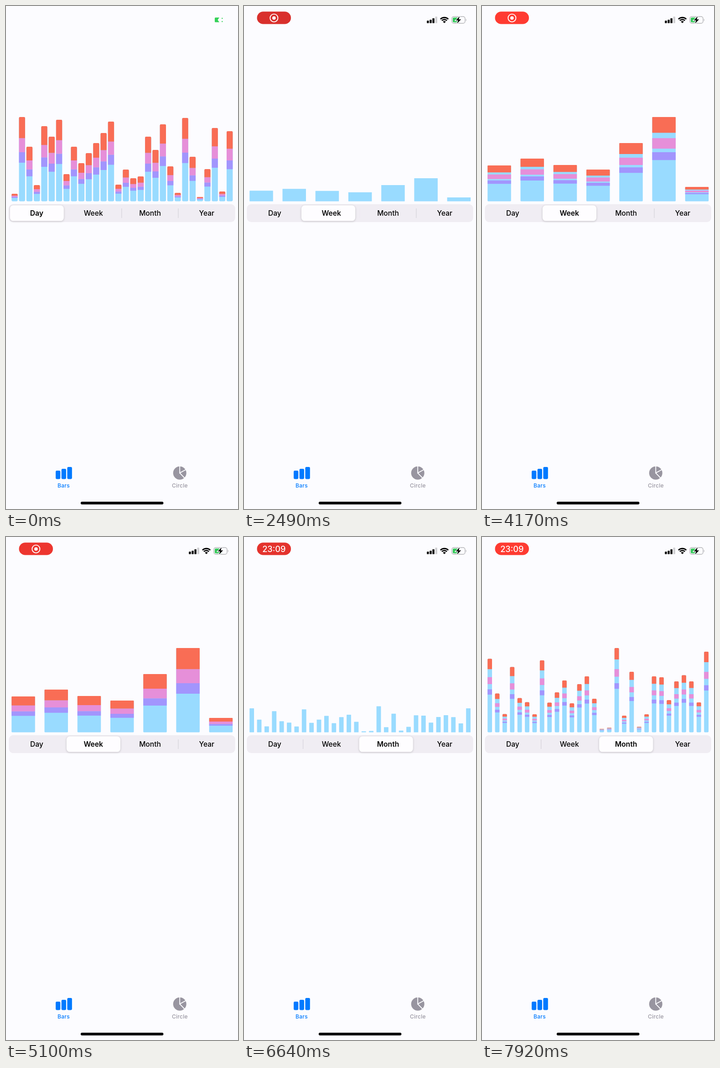
An HTML page that plays this animation: 509 by 1101 pixels, repeating every 8000 ms.

```html
<!DOCTYPE html>
<html lang="en">
<head>
<meta charset="utf-8">
<title>Stacked bars</title>
<style>
  html, body { margin: 0; width: 100%; height: 100%; overflow: hidden; background: #fcfcff; }
  svg { display: block; width: 100%; height: 100%; font-family: Inter, "Liberation Sans", sans-serif; }
  .thumb { filter: drop-shadow(0 1.5px 2px rgba(0, 0, 0, .2)); }
</style>
</head>
<body>
<svg viewBox="0 0 509 1101">
  <rect width="509" height="1101" fill="#fcfcff"/>

  <g id="status">
    <rect id="pill" x="28.5" y="12.2" width="74.5" height="27.4" rx="13.7"/>
    <g id="record">
      <circle cx="65.8" cy="26.2" r="8.6" fill="none" stroke="#fff" stroke-width="1.9"/>
      <circle cx="65.8" cy="26.2" r="3.8" fill="#fff"/>
    </g>
    <text id="clock" x="65.8" y="32.6" font-size="18.2" font-weight="500" fill="#fff" text-anchor="middle">23:09</text>

    <rect x="401.2" y="32" width="4.4" height="5.6" rx="1.2"/>
    <rect x="407.3" y="30" width="4.4" height="7.6" rx="1.2"/>
    <rect x="413.4" y="26.8" width="4.4" height="10.8" rx="1.2"/>
    <rect x="419.5" y="23.3" width="4.4" height="14.3" rx="1.2" fill="#cfcfd2"/>

    <path d="M439.6 37.6 l-3.3 -3.3 a4.7 4.7 0 0 1 6.6 0z"/>
    <path d="M434 31.9 a7.8 7.8 0 0 1 11.2 0 M431 28.8 a12.2 12.2 0 0 1 17.2 0" fill="none" stroke="#000" stroke-width="2.8"/>

    <rect x="456" y="23.2" width="29" height="14.6" rx="4.4" fill="none" stroke="#a6a6aa" stroke-width="1.2"/>
    <path d="M486.8 28.2 q2.4 2.3 0 4.6z" fill="#a6a6aa"/>
    <path d="M460 25.2 h13 v10.6 h-13 q-2 0 -2 -2 v-6.6 q0 -2 2 -2z" fill="#34c759"/>
    <path d="M473.2 22.4 L464.6 31.6 H469.6 L467.4 38.6 L476.2 29.2 H471.2z" stroke="#fcfcff" stroke-width="2.6" paint-order="stroke"/>
  </g>
  <g id="sparse" fill="#34d158">
    <path d="M459.5 25.2 h8.5 l-3.6 5.3 3.6 5.1 h-8.5 q-1.5 0 -1.5 -1.5 v-7.4 q0 -1.5 1.5 -1.5z"/>
    <circle cx="474.3" cy="27" r="1.2"/><circle cx="474.3" cy="34" r="1.2"/>
  </g>

  <g id="chart"></g>

  <rect x="6.3" y="433.8" width="496.5" height="39.2" rx="9.5" fill="#f0edf3"/>
  <g id="seps"></g>
  <rect id="thumb" class="thumb" y="436.2" width="118.2" height="34.4" rx="7.5" fill="#fefdff"/>
  <g id="labels" font-size="15.6" text-anchor="middle"></g>

  <g fill="#007aff">
    <rect x="109" y="1017" width="10.2" height="18.4" rx="2.4"/>
    <rect x="121.7" y="1013" width="10.2" height="22.4" rx="2.4"/>
    <rect x="134.4" y="1009" width="10.4" height="26.4" rx="2.4"/>
  </g>
  <circle cx="381.2" cy="1022.2" r="14.5" fill="#9895a0"/>
  <path d="M381.2 1006 V1022.2 L396 1014 M381.2 1022.2 L393 1034.5" fill="none" stroke="#fcfcff" stroke-width="1.9"/>
  <g font-size="12" font-weight="500" letter-spacing=".25" text-anchor="middle">
    <text x="126.5" y="1054" fill="#007aff">Bars</text>
    <text x="381.4" y="1054" fill="#9895a0">Circle</text>
  </g>
  <rect x="163.8" y="1085" width="181.6" height="6" rx="3"/>
</svg>

<script>
const LOOP = 8000, BASE = 427.5;
const BLUE = '#99dbff';
// Upper segments: colour, top and height as shares of the whole bar
const PARTS = [['#a295fd', 14 / 24, 3 / 24], ['#e68fd9', 18 / 24, 4 / 24], ['#f96d55', 1, 6 / 24]];

const DAY = { start: -9000, tab: 0, pitch: 16.27, width: 13.4, r: 2.4, tops: [
  411, 243, 308, 392, 263, 286, 249, 368, 308, 344, 322, 300, 278, 253, 391,
  358, 377, 373, 286, 315, 259, 351, 409, 245, 330, 418, 357, 267, 406, 274] };
const WEEK = { start: 1722, tab: 1, pitch: 72.25, width: 51.5, r: 1.4, tops: [349, 334, 348, 358, 300, 243, 396] };
const MONTH = { start: 5810, tab: 2, pitch: 16.38, width: 9.8, r: 2, tops: [
  266.5, 342.5, 387.5, 284.5, 352.5, 361.5, 388, 270, 362.5, 340, 314, 364, 322, 305, 354,
  420, 417.5, 243, 391, 295, 415.5, 388, 305, 307, 357, 316, 302.5, 316, 362, 251] };
const CHARTS = [DAY, WEEK, MONTH];

const $ = id => document.getElementById(id);
const clamp = v => Math.max(0, Math.min(1, v));
const rise = ms => clamp(ms / 1963) ** 1.3;
const reveal = ms => clamp((ms - 1780) / 1212) ** .437;
const slide = ms => 1 - Math.exp(-((Math.max(0, ms) / 430) ** 1.834));
const tabX = i => 8.6 + 124.2 * i;

function add(parent, tag, attrs, text = '') {
  const el = document.createElementNS('http://www.w3.org/2000/svg', tag);
  for (const k in attrs) el.setAttribute(k, attrs[k]);
  el.textContent = text;
  return parent.appendChild(el);
}

const labels = ['Day', 'Week', 'Month', 'Year'].map((s, i) =>
  add($('labels'), 'text', { x: 67.4 + 124.3 * i, y: 459.2 }, s));
const seps = [129.6, 253.8, 378].map(x =>
  add($('seps'), 'rect', { x: x - .6, y: 443, width: 1.2, height: 21, fill: '#d5d2da' }));

function box(x, y, w, h, top, bottom, fill) {
  const a = Math.min(top, h / 2), b = Math.min(bottom, h / 2);
  return `<path fill="${fill}" d="M${x} ${y + a}q0 ${-a} ${a} ${-a}h${w - 2 * a}q${a} 0 ${a} ${a}` +
    `V${y + h - b}q0 ${b} ${-b} ${b}h${2 * b - w}q${-b} 0 ${-b} ${-b}z"/>`;
}

function drawChart(c, t) {
  return c.tops.map((top, i) => {
    const ms = t - c.start - 60 * i / c.tops.length;
    const grown = rise(ms), shown = reveal(ms);
    const h = (BASE - top) * grown, x = 12.2 + i * c.pitch, r = c.r * grown;
    if (h <= 0) return '';
    let out = box(x, BASE - h, c.width, h, r, r, BLUE);
    if (shown > 0) for (const [fill, at, size] of PARTS)
      out += box(x, BASE - h * at, c.width, h * size * shown, at === 1 ? r : 0, 0, fill);
    return out;
  }).join('');
}

function drawTabs(chart, t) {
  const q = slide(t - chart.start), now = chart.tab, old = Math.max(0, now - 1);
  $('thumb').setAttribute('x', tabX(old + (now - old) * q));
  labels.forEach((el, i) => {
    el.setAttribute('font-weight', i === now && q > .5 ? 600 : 500);
    el.setAttribute('opacity', i === now ? 1 - .8 * q * (1 - q) : 1);
  });
  const open = (i, tab) => i !== tab && i !== tab - 1;
  seps.forEach((el, i) => {
    const a = open(i, old), b = open(i, now);
    el.setAttribute('opacity', a && b ? 1 : a ? 1 - q * q : b ? q ** 3 : 0);
  });
}

function drawStatus(t) {
  const ready = t >= 20;
  $('status').setAttribute('display', ready ? 'inline' : 'none');
  $('sparse').setAttribute('display', ready ? 'none' : 'inline');
  const glow = .5 + .5 * Math.cos((t - 750) / 3500 * 2 * Math.PI);
  const mix = (a, b) => Math.round(a + (b - a) * glow);
  $('pill').setAttribute('fill', `rgb(${mix(217, 255)},${mix(48, 59)},${mix(44, 49)})`);
  const swap = clamp((t - 5950) / 320);
  $('record').setAttribute('opacity', 1 - swap);
  $('clock').setAttribute('opacity', swap);
}

function draw(t) {
  const chart = CHARTS.filter(c => t >= c.start).pop();
  $('chart').innerHTML = drawChart(chart, t);
  drawTabs(chart, t);
  drawStatus(t);
}

let begin;
function tick(now) {
  begin ??= now;
  draw((now - begin) % LOOP);
  requestAnimationFrame(tick);
}
draw(0);
requestAnimationFrame(tick);
</script>
</body>
</html>
```
